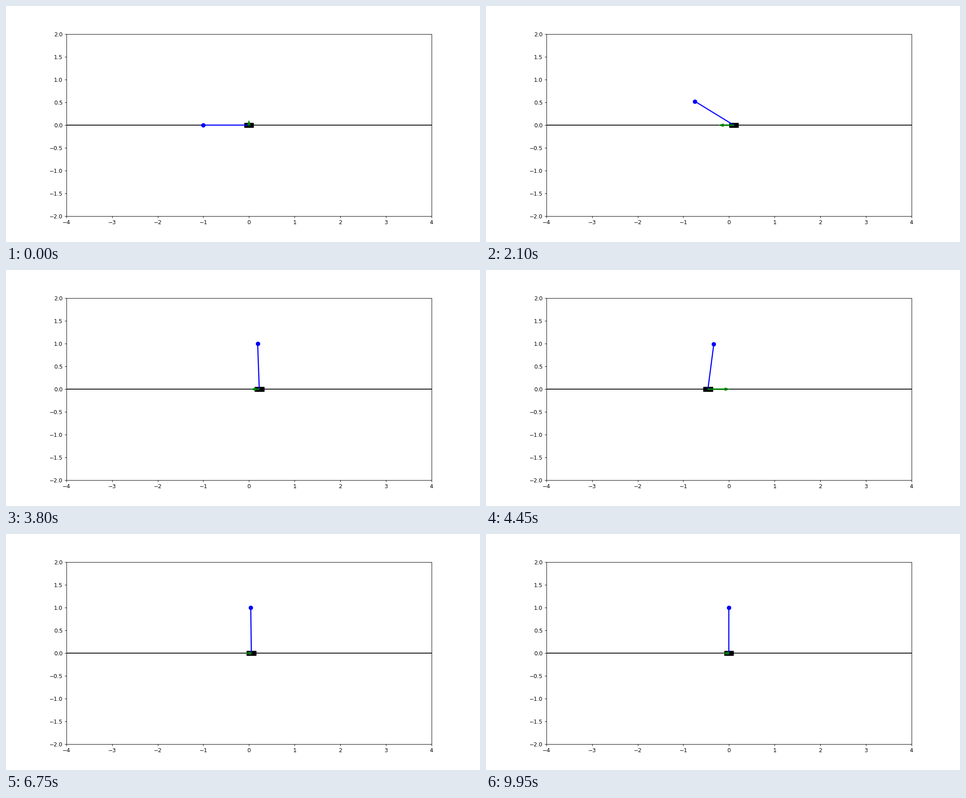
Animation of 1058 by 529 pixels, one loop 10000 ms. Source, as a matplotlib script:

```python
import matplotlib.pyplot as plt
import numpy as np
from matplotlib.animation import FuncAnimation
from matplotlib.patches import FancyArrow, Rectangle

FRAMES, INTERVAL = 200, 50
CART_W, CART_H = 0.2, 0.1
BOB_SHARE = 1 / 6      # bob mass over total mass
PUSH_SCALE = 0.12      # arrow length per unit of acceleration
PUSH_LIMIT = 0.62
PUSH_BIAS = 0.01
RELEASE_END = 1.14     # until then the cart rolls freely
UP = -np.pi

# Turning points as (time, value); the angle is measured from hanging down
ANGLE_TURNS = [(0, -np.pi / 2), (RELEASE_END, np.pi / 2), (2.56, UP - 0.13),
               (2.7, UP - 0.13), (3.2, UP + 0.35), (4.2, UP - 0.13),
               (4.4, UP - 0.13), (5.7, UP + 0.035), (7.5, UP)]
CART_TURNS = [(RELEASE_END, -2 * BOB_SHARE), (1.6, -0.62), (2.35, 0.35),
              (2.72, 0.35), (3.2, 0.77), (4.5, -0.465), (6.05, 0.055),
              (6.5, 0.055), (8.6, 0)]


def swing(turns, t):
    """Cosine easing from one turning point to the next."""
    times, values = np.array(turns).T
    phase = np.interp(t, times, np.arange(len(times)))
    i = np.minimum(phase.astype(int), len(times) - 2)
    eased = (1 - np.cos(np.pi * (phase - i))) / 2
    return values[i] + (values[i + 1] - values[i]) * eased


t = np.arange(FRAMES) * INTERVAL / 1000
angle = swing(ANGLE_TURNS, t)
bob_dx, bob_y = np.sin(angle), -np.cos(angle)

# A free cart keeps the centre of mass still
cart_x = np.where(t < RELEASE_END, -BOB_SHARE * (1 + bob_dx),
                  swing(CART_TURNS, t))
bob_x = cart_x + bob_dx

# The push is what accelerates the centre of mass
centre = cart_x + BOB_SHARE * bob_dx
acceleration = np.gradient(np.gradient(centre, t), t)
push = np.clip(PUSH_SCALE * acceleration, -PUSH_LIMIT, PUSH_LIMIT) - PUSH_BIAS
push[0] = 0

plt.rcParams["font.family"] = "DejaVu Sans"
fig, ax = plt.subplots(figsize=(12, 6), dpi=88.1667)
ax.set_aspect("equal")
ax.set_xlim(-4, 4)
ax.set_ylim(-2, 2)

ax.axhline(0, color="black", lw=1.5, zorder=0.5)
cart = ax.add_patch(Rectangle((0, 0), CART_W, CART_H, color="black"))
rod, = ax.plot([], [], color="blue", lw=2)
bob, = ax.plot([], [], "o", color="blue", ms=7)
arrow = ax.add_patch(FancyArrow(0, 0, 0, 0, width=0.02, head_width=0.06,
                                head_length=0.1, color="green", zorder=3))


def update(i):
    x = cart_x[i]
    cart.set_xy((x - CART_W / 2, -CART_H / 2))
    rod.set_data([x, bob_x[i]], [0, bob_y[i]])
    bob.set_data([bob_x[i]], [bob_y[i]])
    arrow.set_data(x=x, y=0, dx=push[i], dy=0)
    return cart, rod, bob, arrow


anim = FuncAnimation(fig, update, frames=FRAMES, interval=INTERVAL, repeat=True)
plt.show()
```
